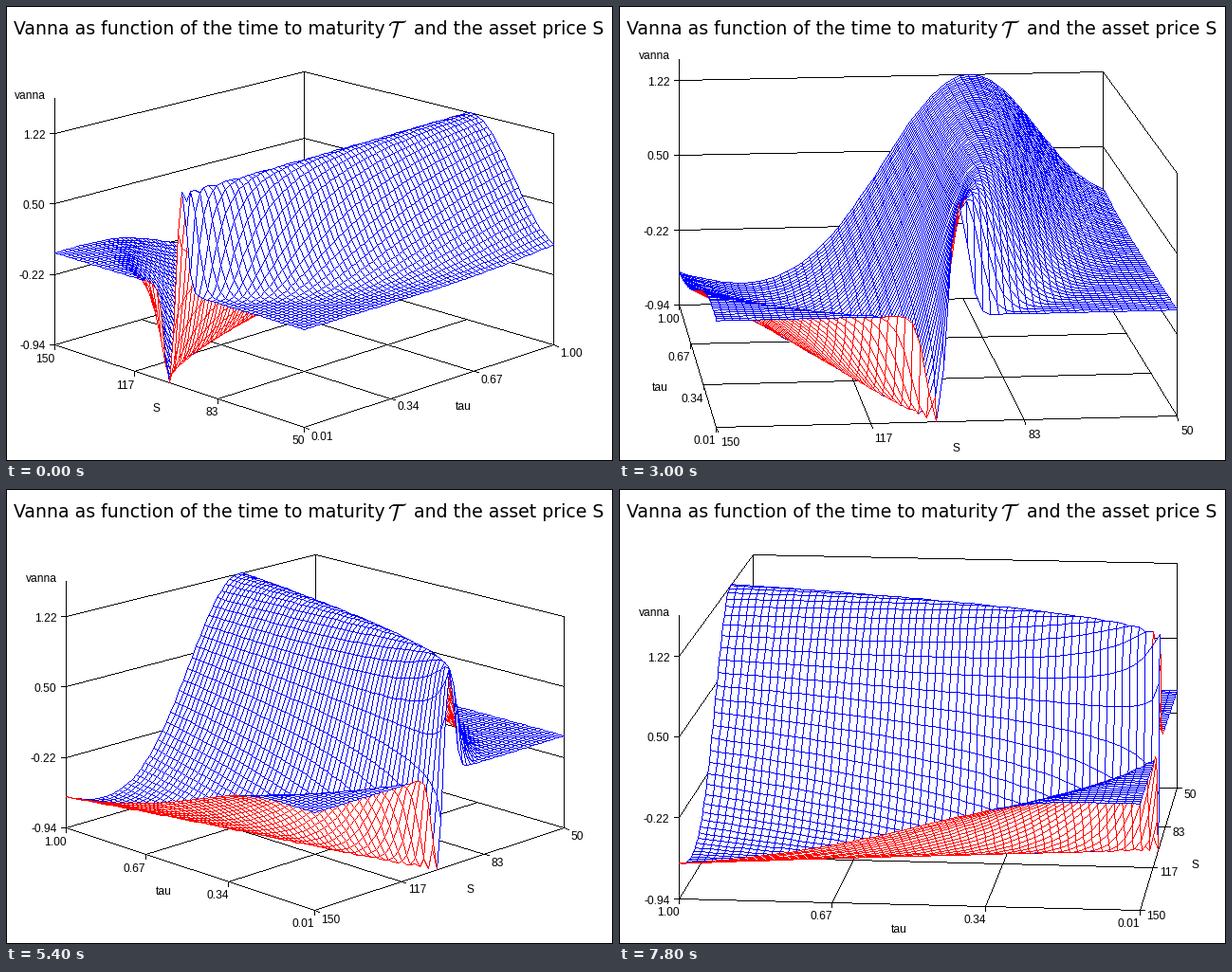
A matplotlib script for the animation above (8000 ms loop, 640 by 480 pixels).

```python
import numpy as np
import matplotlib.pyplot as plt
from matplotlib.animation import FuncAnimation

plt.rcParams["mathtext.fontset"] = "cm"

W, H, DPI = 640, 480, 100
PX = 72 / DPI                    # points per pixel
TOP, BOTTOM = 69, 444            # vertical extent of the projected box
PERSPECTIVE = 0.083
EYE = 6.255                      # eye height in box heights
N = 59                           # cells per side
STEPS, HOLD = 14, 3              # rotation steps, animation frames per step
BLACK, WHITE, BLUE, RED = (0, 0, 0), (255, 255, 255), (0, 0, 255), (255, 0, 0)
TICKS = np.arange(4) / 3
LABELS = {
    "S": ["150", "117", "83", "50"],
    "tau": ["0.01", "0.34", "0.67", "1.00"],
    "z": ["-0.94", "-0.22", "0.50", "1.22"],
}
STRIKE, SIGMA, CARRY = 100, 0.25, -0.05


def vanna(s, tau):
    vol = SIGMA * np.sqrt(tau)
    d1 = (np.log(s / STRIKE) + (CARRY + SIGMA**2 / 2) * tau) / vol
    return -np.exp(-d1**2 / 2) / np.sqrt(2 * np.pi) * (d1 - vol) / SIGMA


# Box coordinates: u runs from S=150 to S=50, v from tau=0.01 to tau=1.
U, V = np.meshgrid(np.linspace(0, 1, N + 1), np.linspace(0, 1, N + 1), indexing="ij")
Z = vanna(150 - 100 * U, 0.01 + 0.99 * V)
Z = (Z - Z.min()) / (Z.max() - Z.min())


class View:
    """Rotated perspective box, stretched to fill the plot area."""

    def __init__(self, step):
        self.first = step < 5
        middle, turn = (0, 45) if self.first else (9, -45)
        self.angle_x = np.radians(turn - 9.46 * (step - middle))
        self.angle_y = np.radians(turn - 10 * (step - middle))
        self.left, self.right = (51, 577) if self.first else (63, 588)

        cu, cv = np.array([0, 1, 1, 0]), np.array([0, 0, 1, 1])
        x, s = self.raw(cu, cv)
        self.x0 = x.min()
        self.sx = (self.right - self.left) / (x.max() - x.min())
        near, far = s.max(), s.min()
        self.sy = (BOTTOM - TOP) / (EYE * (near - far) + far)
        self.y0 = BOTTOM - near * EYE * self.sy

    def depth(self, u, v):
        return (u - 0.5) * np.sin(self.angle_y) - (v - 0.5) * np.cos(self.angle_y)

    def raw(self, u, v):
        s = 1 / (1 - PERSPECTIVE * self.depth(u, v))
        x = (u - 0.5) * np.cos(self.angle_x) + (v - 0.5) * np.sin(self.angle_x)
        return x * s, s

    def __call__(self, u, v, z=0):
        x, s = self.raw(u, v)
        return np.stack([self.left + (x - self.x0) * self.sx,
                         self.y0 + s * (EYE - z) * self.sy], axis=-1)


def box_lines(view):
    lines = []
    for t in TICKS:
        lines.append([view(t, 0), view(t, 1)])
        lines.append([view(0, t), view(1, t)])
    back = (0, 1) if view.first else (1, 1)
    sides = [(0, 0), (1, 1)] if view.first else [(0, 1), (1, 0)]
    for side in sides:
        lines += [[view(*side, z), view(*back, z)] for z in TICKS[1:]]
    for post in (back, sides[1]):
        lines.append([view(*post, 0), view(*post, 1)])
    return lines


def axis_marks(view):
    """Return tick lines and (x, y, text, alignment) labels of all three axes."""
    if view.first:
        left = [view(t, 0) for t in TICKS]
        right = [view(1, t) for t in TICKS]
        names = "S", "tau"
        left_labels, right_labels = LABELS["S"], LABELS["tau"]
        mid_left, mid_right = view(0.5, 0), view(1, 0.5)
        post = (0, 0)
    else:
        left = [view(0, t) for t in TICKS[::-1]]
        right = [view(t, 0) for t in TICKS]
        names = "tau", "S"
        left_labels, right_labels = LABELS["tau"][::-1], LABELS["S"]
        mid_left, mid_right = view(0, 0.5), view(0.5, 0)
        post = (0, 1)

    lines, labels = [], []
    for (x, y), text in zip(left, left_labels):
        lines.append([(x, y), (x, y + 5)])
        labels.append((x, y + 14, text, "right"))

    forward = left[-1] - left[0]
    dx, dy = 5 * forward / np.hypot(*forward)
    for (x, y), text in zip(right, right_labels):
        lines.append([(x, y), (x + dx, y + dy)])
        labels.append((x + 3.2 + 0.8 * dx, y + 5.5 + 1.95 * dy, text, "left"))

    zs = [view(*post, z) for z in TICKS]
    for (x, y), text in zip(zs, LABELS["z"]):
        lines.append([(x - 5, y), (x, y)])
        labels.append((x - 10, y + 1, text, "right"))
    x, top = zs[-1]
    top = max(top - (zs[0][1] - top) / 6, 56)
    lines.append([zs[0], (x, top)])
    labels.append((x - 10, top - 4, "vanna", "right"))

    width = left[-1][0] - left[0][0]
    labels.append((mid_left[0] - 33 + 0.064 * width, mid_left[1] + 25, names[0], "right"))
    share = (right[-1][0] - right[0][0]) / 485
    labels.append((mid_right[0] + 34 - 29 * share**1.7,
                   mid_right[1] + 18 + 9 * share, names[1], "left"))
    return lines, labels


def draw_line(canvas, start, end, color):
    """Draw a line one pixel wide, without antialiasing."""
    (x0, y0), (x1, y1) = start, end
    n = max(abs(x1 - x0), abs(y1 - y0), 1)
    t = np.arange(n + 1) / n
    xs = np.floor(x0 + (x1 - x0) * t + 0.5).astype(int)
    ys = np.floor(y0 + (y1 - y0) * t + 0.5).astype(int)
    canvas[ys, xs] = color


def fill_polygon(canvas, points, color):
    """Fill a polygon by the even-odd rule."""
    xs, ys = zip(*points)
    left, top = min(xs), min(ys)
    px = np.arange(left, max(xs) + 1)[None, :]
    py = np.arange(top, max(ys) + 1)[:, None]
    inside = np.zeros((py.size, px.size), bool)
    for (x0, y0), (x1, y1) in zip(points, points[1:] + points[:1]):
        if y0 != y1:
            crosses = (y0 > py) != (y1 > py)
            inside ^= crosses & (px < x0 + (py - y0) * ((x1 - x0) / (y1 - y0)))
    canvas[top:top + py.size, left:left + px.size][inside] = color


def cells(grid):
    """Stack the four corners of every cell."""
    return np.stack([grid[:-1, :-1], grid[1:, :-1], grid[1:, 1:], grid[:-1, 1:]], axis=2)


def draw_surface(canvas, view):
    """Paint the mesh from back to front, its underside in red."""
    quads = cells(view(U, V, Z)).reshape(-1, 4, 2)
    order = np.argsort(cells(view.depth(U, V)).mean(axis=2).ravel())
    quads = quads[order]
    d1, d2 = quads[:, 2] - quads[:, 0], quads[:, 3] - quads[:, 1]
    below = d1[:, 0] * d2[:, 1] - d1[:, 1] * d2[:, 0] > 0
    for quad, under in zip(np.rint(quads).astype(int).tolist(), below):
        fill_polygon(canvas, quad, WHITE)
        for start, end in zip(quad, quad[1:] + quad[:1]):
            draw_line(canvas, start, end, RED if under else BLUE)


def render(step):
    view = View(step)
    ticks, labels = axis_marks(view)
    canvas = np.full((H, W, 3), 255, np.uint8)
    canvas[[0, -1]] = canvas[:, [0, -1]] = BLACK
    for line in box_lines(view) + ticks:
        start, end = np.rint(line).astype(int).tolist()
        draw_line(canvas, start, end, BLACK)
    draw_surface(canvas, view)
    return canvas, labels


scenes = [render(step) for step in range(STEPS)]

fig = plt.figure(figsize=(W / DPI, H / DPI), dpi=DPI, facecolor="white")
ax = fig.add_axes([0, 0, 1, 1])
picture = ax.imshow(scenes[0][0], interpolation="nearest", aspect="auto")
ax.axis("off")

title = dict(family="DejaVu Sans", size=18.85 * PX, va="baseline")
ax.text(8, 30, "Vanna as function of the time to maturity", **title)
ax.text(402, 31, r"$\mathcal{T}$", size=23 * PX, va="baseline")
ax.text(629.5, 30, "and the asset price S", ha="right", **title)
texts = [ax.text(0, 0, "", family="Liberation Sans", size=12 * PX, va="baseline")
         for _ in scenes[0][1]]


def update(frame):
    canvas, labels = scenes[frame // HOLD]
    picture.set_data(canvas)
    for item, (x, y, text, align) in zip(texts, labels):
        item.set(position=(round(x), round(y) + 4), text=text, ha=align)
    return [picture, *texts]


anim = FuncAnimation(fig, update, frames=40, interval=200, repeat=True,
                     repeat_delay=0, blit=False)
plt.show()
```
